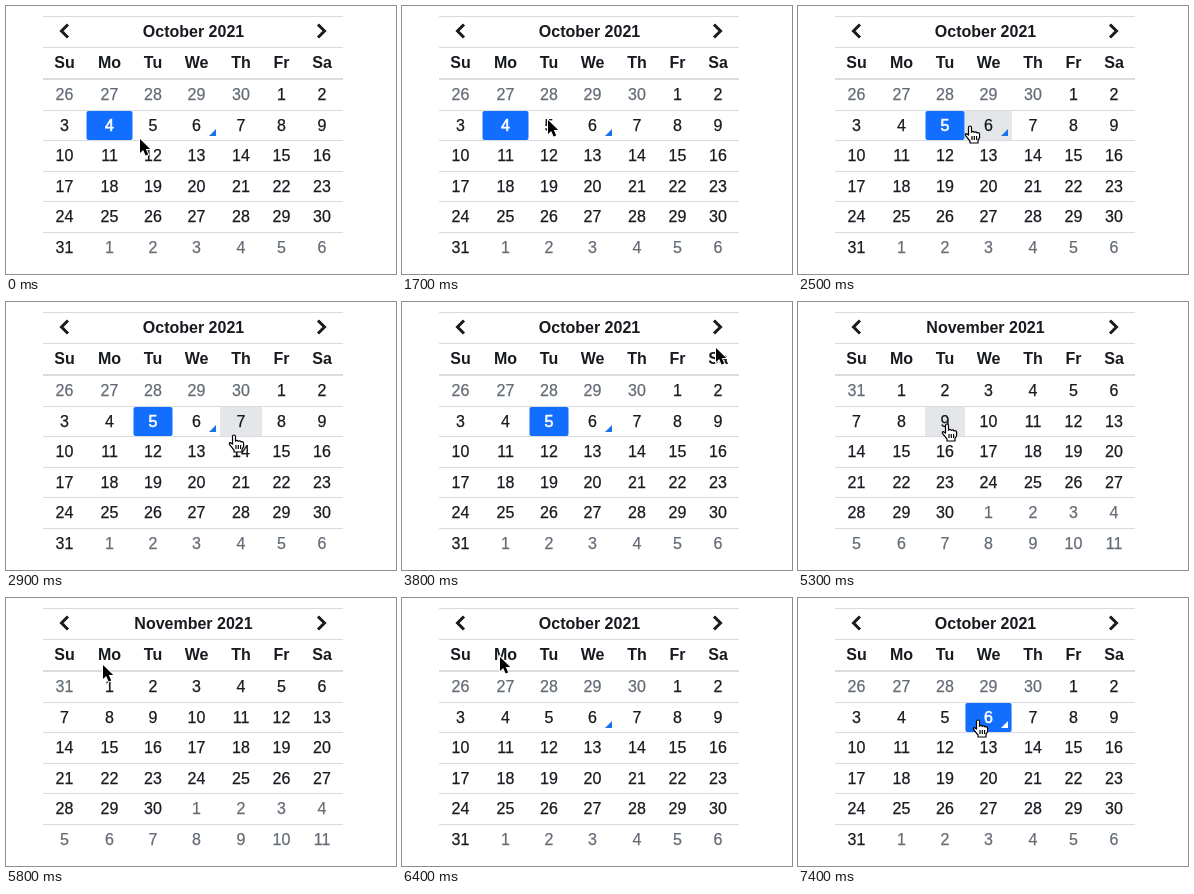
Write an HTML page that moves like this. It is 390x268 px and loops after 7.5 s.

```html
<!DOCTYPE html>
<html lang="en">
<head>
<meta charset="utf-8">
<title>Calendar</title>
<style>
html, body { margin: 0; width: 100%; height: 100%; overflow: hidden; background: #fff; }
svg { display: block; width: 390px; height: 268px; color: #171a1f; }
text { font: 16px "Liberation Sans", Arial, sans-serif; text-anchor: middle; fill: currentColor; stroke: currentColor; stroke-width: .25; }
.bold { font-weight: 700; stroke: none; }
.muted { color: #636b75; }
.on { color: #fff; stroke-width: .6; }
.chevron { fill: none; stroke: currentColor; stroke-width: 3; }
#arrow { stroke: #fff; stroke-width: 2; paint-order: stroke; }
#hand { fill: #fff; stroke: #000; stroke-width: 1.2; }
</style>
</head>
<body>
<svg id="stage" viewBox="0 0 390 268">
  <g id="lines" fill="#d8dbe0"></g>
  <rect id="hover" fill="#e4e6ea" rx="1"/>
  <rect id="picked" fill="#126eff" rx="2"/>
  <g id="labels"></g>
  <path class="chevron" d="M62 18.5 55.5 25l6.500 6.500"/>
  <path class="chevron" d="M312 18.500 318.500 25l-6.500 6.500"/>
  <path id="mark" d="M210 123v7h-7z"/>
  <g id="cursor">
    <path id="arrow" d="M0 0v14l3.200-3 2.400 5.500 2.600-1.100-2.400-5.300h4.400z"/>
    <path id="hand" d="M-2.500 9V1.500Q-2.500 0-1 0t1.500 1.500V6q1.500-1.200 2.800.3 1.500-1 2.700.5 2.600-.6 2.600 1.700v3l-1.600 3v2.500H-1v-2l-4.300-5.300Q-6.400 8-4.600 7.700zM1 10v4M3.300 10v4M5.600 10v4"/>
  </g>
</svg>
<script>
const LOOP = 7500, STEP = 100;
const LEFT = 37, HEAD = 10, HEAD_ROW = 31, BODY = 73, ROW = 30.6;
const cols = [LEFT, 80, 127, 167, 214, 256, 295, 337];
const rowLine = r => Math.round(BODY + ROW * r);
const middle = c => (cols[c] + cols[c + 1]) / 2;
const $ = id => document.getElementById(id);

function set(el, attrs) {
  for (const key in attrs) el.setAttribute(key, attrs[key]);
}
function add(parent, name, attrs, text = '') {
  const el = document.createElementNS('http://www.w3.org/2000/svg', name);
  set(el, attrs);
  el.textContent = text;
  parent.append(el);
  return el;
}
const label = (x, y, cls, text) => add($('labels'), 'text', { x, y, class: cls }, text);
const line = (y, height) => add($('lines'), 'rect', { x: LEFT, y, width: 300, height });

for (let i = 0; i < 3; i++) line(HEAD + HEAD_ROW * i, i < 2 ? 1 : 2);
for (let r = 1; r < 6; r++) line(rowLine(r), 1);

const title = label(187.5, 31, 'bold');
['Su', 'Mo', 'Tu', 'We', 'Th', 'Fr', 'Sa'].forEach((day, c) => label(middle(c), 62, 'bold', day));
const days = Array.from({ length: 42 }, (_, i) =>
  label(middle(i % 7), BODY + 21 + ROW * Math.floor(i / 7), ''));

// Pointer moves: start time, end time, x, y reached
const moves = [
  [900, 1300, 144, 108], [1300, 1700, 146, 114], [1800, 2200, 159, 117],
  [2400, 2900, 229, 133], [2900, 3200, 262, 159], [3600, 3800, 314, 46],
  [3900, 4300, 314, 24], [4500, 5200, 150, 122], [5400, 6100, 58, 25],
  [6300, 6400, 98, 59], [6400, 7100, 181, 122]
];

function pointer(t) {
  let x = 134, y = 133;
  for (const [from, to, toX, toY] of moves) {
    const k = Math.min(1, Math.max(0, (t - from) / (to - from)));
    x += (toX - x) * k;
    y += (toY - y) * k;
  }
  return [Math.round(x), Math.round(y)];
}

// Clickable cell under the pointer; row -1 holds the month buttons
function hit(x, y) {
  const c = cols.findIndex(edge => edge > x) - 1;
  if (y < HEAD + HEAD_ROW) return c % 6 ? null : c - 7;
  const r = Math.floor((y - BODY) / ROW);
  return r < 0 ? null : r * 7 + c;
}

function box(el, cell, inset = 0) {
  el.style.display = cell === null ? 'none' : '';
  if (cell === null) return;
  const c = (cell + 7) % 7, r = Math.floor(cell / 7);
  const top = (r < 0 ? HEAD : rowLine(r)) + 1;
  const bottom = r < 0 ? HEAD + HEAD_ROW : rowLine(r + 1);
  set(el, { x: cols[c] + inset, y: top, width: cols[c + 1] - cols[c] - 2 * inset, height: bottom - top });
}

function draw(now) {
  const t = Math.floor(now % LOOP / STEP) * STEP;
  const november = t >= 4500 && t < 6400;
  const picked = t < 2500 ? 8 : t < 4500 ? 9 : t >= 7200 ? 10 : null;
  const [x, y] = pointer(t);
  const idle = t < 1900 || t >= 3200 && t < 4000;
  const over = idle ? null : hit(x, y);

  const [first, size, before] = november ? [1, 30, 31] : [5, 31, 30];
  title.textContent = november ? 'November 2021' : 'October 2021';
  days.forEach((el, i) => {
    const d = i - first + 1;
    el.textContent = d < 1 ? d + before : d > size ? d - size : d;
    set(el, { class: i === picked ? 'on' : d < 1 || d > size ? 'muted' : '' });
  });

  box($('hover'), over);
  box($('picked'), picked, 0.5);
  $('mark').style.display = november ? 'none' : '';
  set($('mark'), { fill: picked === 10 ? '#fff' : '#1a73e8' });
  $('arrow').style.display = over === null ? '' : 'none';
  $('hand').style.display = over === null ? 'none' : '';
  set($('cursor'), { transform: `translate(${x} ${y})` });
}

const start = performance.now();
(function tick() {
  draw(performance.now() - start);
  requestAnimationFrame(tick);
})();
</script>
</body>
</html>
```
